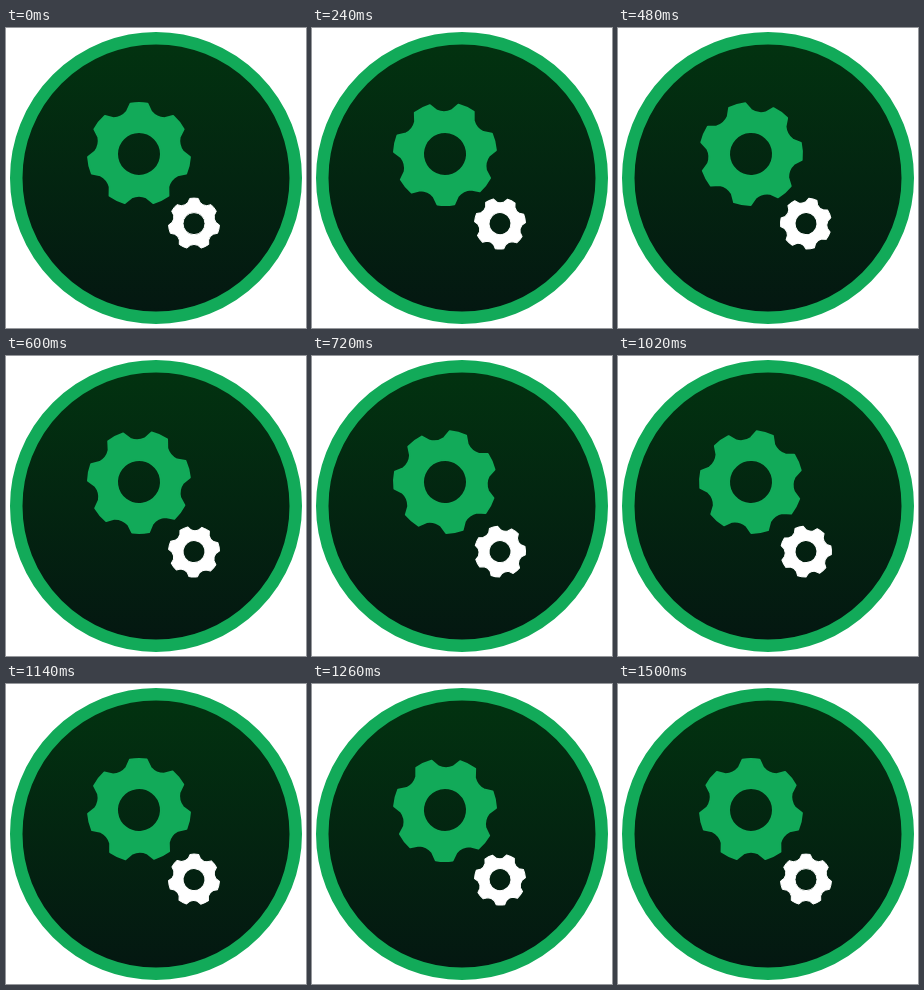
Write an HTML page that moves like this. It is 300 px wide and 300 px high and loops after 1.62 s.

```html
<!DOCTYPE html>
<html lang="en">
<head>
<meta charset="utf-8">
<title>Turning gears</title>
<style>
  html, body { margin: 0; width: 100%; height: 100%; overflow: hidden; background: #fff; }
  svg { display: block; width: 100vw; height: 100vh; }
</style>
</head>
<body>
<svg viewBox="0 0 300 300">
  <defs>
    <linearGradient id="night" x1="0" y1="0" x2="0" y2="1">
      <stop offset="0" stop-color="#023310"/>
      <stop offset="1" stop-color="#041711"/>
    </linearGradient>
    <path id="gear" fill-rule="evenodd" stroke-width="2" stroke-linejoin="round"/>
  </defs>
  <circle cx="150" cy="150" r="139.75" fill="url(#night)" stroke="#12aa59" stroke-width="12.5"/>
  <use id="big" href="#gear" fill="#12aa59" stroke="#12aa59"/>
  <use id="small" href="#gear" fill="#fff" stroke="#fff"/>
</svg>
<script>
  const TEETH = 7, STEP = 30, TURN = 1500, LOOP = 1620;
  const byId = id => document.getElementById(id);

  const polar = (degrees, radius) => {
    const a = degrees * Math.PI / 180;
    return `${(radius * Math.sin(a)).toFixed(2)} ${(-radius * Math.cos(a)).toFixed(2)}`;
  };

  function gearPath() {
    const pitch = 360 / TEETH;
    let d = '';
    for (let i = 0; i < TEETH; i++) {
      const a = i * pitch;
      d += `${i ? 'L' : 'M'}${polar(a - 9.5, 51)}A51 51 0 0 1 ${polar(a + 9.5, 51)}`
        + `L${polar(a + 16, 44)}Q${polar(a + pitch / 2, 40)} ${polar(a + pitch - 16, 44)}`;
    }
    return d + 'ZM22 0A22 22 0 1 0 -22 0A22 22 0 1 0 22 0Z';
  }

  function place(id, x, y, scale, angle) {
    byId(id).setAttribute('transform', `translate(${x} ${y}) scale(${scale}) rotate(${angle})`);
  }

  function draw(now) {
    const time = Math.floor((now % LOOP) / STEP) * STEP;
    const p = Math.min(time / TURN, 1);
    const angle = 360 * p * p * (3 - 2 * p);
    place('big', 133, 126, 1, angle);
    place('small', 188, 195.6, 0.5, -angle);
  }

  byId('gear').setAttribute('d', gearPath());
  const start = performance.now();
  function tick() {
    draw(performance.now() - start);
    requestAnimationFrame(tick);
  }
  tick();
</script>
</body>
</html>
```
